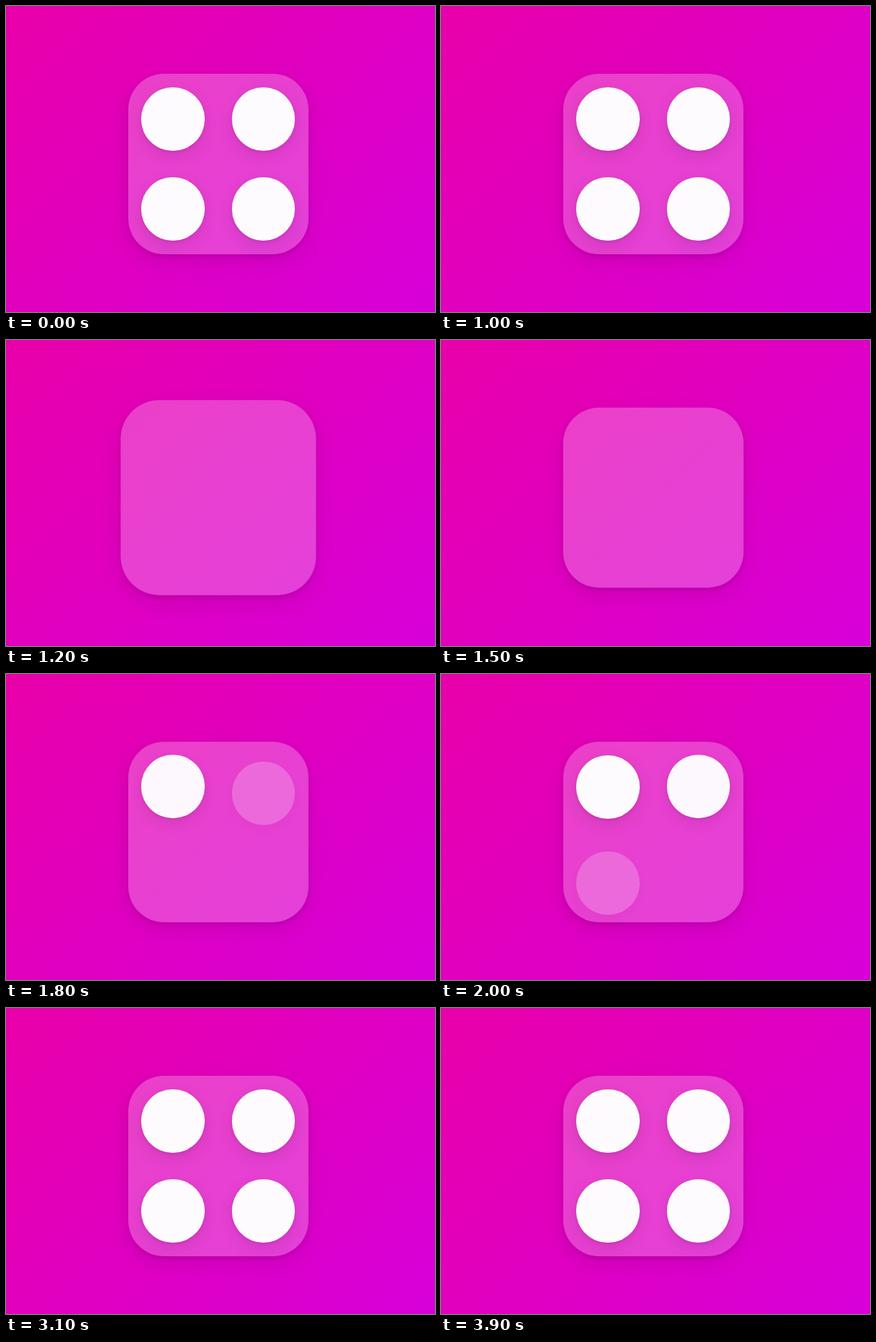
An HTML page that plays this animation: 600x429 px, repeating every 4000 ms.

```html
<!DOCTYPE html>
<html lang="en">
<head>
<meta charset="utf-8">
<title>Dot tile</title>
<style>
  html, body { margin: 0; width: 100%; height: 100%; overflow: hidden; }
  body { position: relative; background: linear-gradient(135deg, #e800a9, #d700d9); }
  #tile {
    position: absolute; left: 170.8px; top: 95.3px; width: 252.4px; height: 252.4px;
    border-radius: 50px; background: rgba(255, 255, 255, .25);
    box-shadow: 0 3px 6px rgba(0, 0, 0, .09), 0 10px 30px rgba(0, 0, 0, .09);
  }
  #tile i {
    position: absolute; width: 88.6px; height: 88.6px; border-radius: 50%;
    background: #fdfbfe;
    box-shadow: 0 2px 5px rgba(0, 0, 0, .09), 0 8px 24px rgba(0, 0, 0, .09);
  }
</style>
</head>
<body>
<div id="tile"><i></i><i></i><i></i><i></i></div>
<script>
const LOOP = 4000, STEP = 100;
const PRESS = 1050, PEAK = 1250, REVEAL = 1550;
const STAGGER = 200, RISE = 300, SWELL = 0.088;
const tile = document.getElementById('tile');
const dots = [...tile.children];

dots.forEach((dot, i) => {
  dot.style.left = 18.7 + (i % 2) * 126.4 + 'px';
  dot.style.top = 18.7 + (i >> 1) * 126.2 + 'px';
});

// cubic-bezier(.25, .1, .25, 1)
function ease(x) {
  if (x <= 0) return 0;
  if (x >= 1) return 1;
  const curve = (a, b, s) => 3 * a * s * (1 - s) ** 2 + 3 * b * s * s * (1 - s) + s ** 3;
  let lo = 0, hi = 1;
  for (let k = 0; k < 24; k++) {
    const mid = (lo + hi) / 2;
    if (curve(.25, .25, mid) < x) lo = mid; else hi = mid;
  }
  return curve(.1, 1, lo);
}

function draw(t) {
  const swell = ease((t - PRESS) / (PEAK - PRESS)) - ease((t - PEAK) / (REVEAL - PEAK));
  tile.style.transform = swell ? `scale(${1 + SWELL * swell})` : 'none';
  dots.forEach((dot, i) => {
    const p = t < PRESS ? 1 : ease((t - REVEAL - i * STAGGER) / RISE);
    dot.style.opacity = p;
    // the rise passes its resting place slightly, then settles at once
    dot.style.transform = p < 1 ? `translateY(${11.5 - 12.5 * p}px)` : 'none';
  });
}

function frame(now) {
  draw(Math.floor((now + 5) / STEP) * STEP % LOOP);
  requestAnimationFrame(frame);
}
draw(0);
requestAnimationFrame(frame);
</script>
</body>
</html>
```
